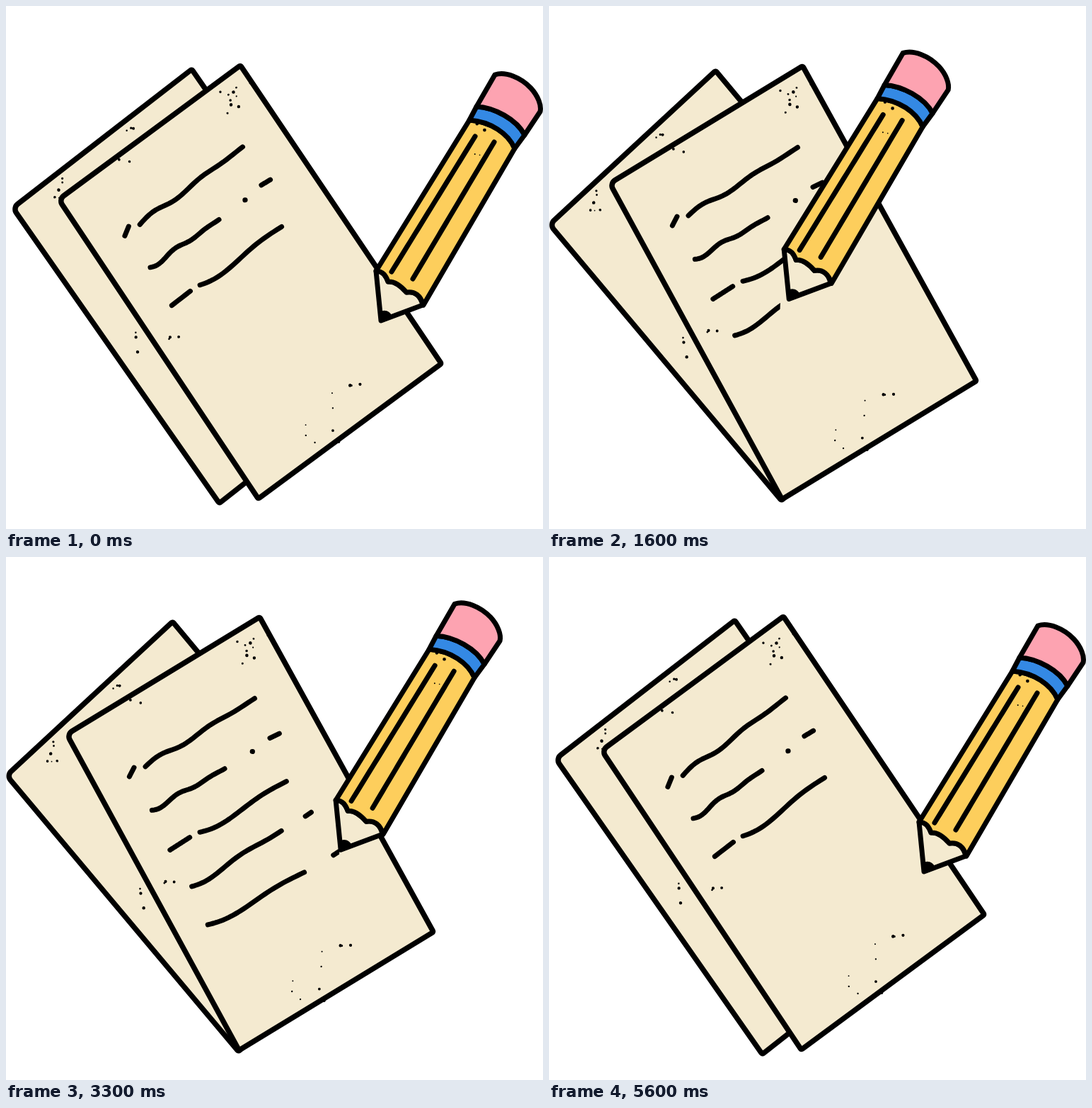
An HTML page with a canvas for the animation above (5730 ms loop, 759 px wide and 738 px high).

```html
<!DOCTYPE html>
<html lang="en">
<head>
<meta charset="utf-8">
<title>Writing pencil</title>
<style>
  html, body { margin: 0; width: 100%; height: 100%; overflow: hidden; background: #fff; }
  canvas { display: block; }
</style>
</head>
<body>
<canvas id="stage" width="759" height="738"></canvas>
<script>
const ctx = document.getElementById('stage').getContext('2d');
const LOOP = 5730, LAST = 70, TILT = 2.55;
const INK = '#000', CREAM = '#f4ead0', YELLOW = '#fdce5c', PINK = '#fda3b1', BLUE = '#3489e4';
const REST = [529, 444];

const clamp = v => Math.min(1, Math.max(0, v));
const lerp = (a, b, p) => a + (b - a) * p;
const ease = p => 0.5 - 0.5 * Math.cos(Math.PI * clamp(p));
const span = (n, from, to) => ease((n - from) / (to - from));

let seed = 7;
const random = () => (seed = seed * 16807 % 2147483647) / 2147483647;

// Ink specks scattered around a point
function specks(cx, cy, rx, ry, count) {
  const path = new Path2D();
  for (let i = 0; i < count; i++) {
    const x = cx + rx * (2 * random() - 1), y = cy + ry * (2 * random() - 1);
    path.moveTo(x, y);
    path.arc(x, y, .8 + 1.6 * random(), 0, 7);
  }
  return path;
}

// Closed outline; only the first corner is clearly rounded
function outline(...corners) {
  const path = new Path2D(), [a, b] = corners;
  path.moveTo((a[0] + b[0]) / 2, (a[1] + b[1]) / 2);
  for (let i = 1; i <= corners.length; i++) {
    const at = corners[i % corners.length], next = corners[(i + 1) % corners.length];
    path.arcTo(...at, ...next, at === a ? 9 : 2);
  }
  path.closePath();
  return path;
}

// Pen stroke that wobbles most at its start
function pen(x0, y0, x1, y1, bow = 0, turns = 1) {
  const path = new Path2D();
  for (let p = 0; p <= 1; p += 1 / 32) {
    const wobble = bow * (1 - p) * Math.sin(2 * Math.PI * turns * p);
    path.lineTo(lerp(x0, x1, p), lerp(y0, y1, p) + wobble);
  }
  return path;
}

function join(...paths) {
  const all = new Path2D();
  paths.forEach(p => all.addPath(p));
  return all;
}

// Both sheets are described halfway through their turn, then tilted either way.
const backSheet = {
  pivot: [270, 395],
  shape: outline([5, 296.5], [249, 90], [556, 493], [315, 700]),
  specks: join(specks(175, 172, 14, 10, 3), specks(62, 270, 18, 24, 6), specks(189, 477, 8, 18, 3))
};
const frontSheet = {
  pivot: [335, 390],
  shape: outline([80, 261.5], [345, 84], [610, 517], [343, 696]),
  specks: join(specks(337, 131, 25, 24, 10), specks(167, 209, 21, 13, 2),
    specks(232, 464, 10, 6, 3), specks(475, 555, 25, 18, 5), specks(440, 605, 26, 20, 6))
};

const oldLines = join(
  pen(171, 317, 177, 304), pen(193, 302, 343, 199, -4.5, 2),
  pen(205, 363, 305, 300, 4, 2), pen(343, 274, 343.3, 274), pen(367, 254, 380, 247),
  pen(233, 418, 260, 399), pen(274, 391, 393, 314, 9, .8));

// on / off: steps during which a line is written and wiped; from / to: pencil tip meanwhile
const newLines = [
  { on: [13, 27.6], off: [57.35, 62.2], from: [254, 470], to: [434, 349], x: [262, 436],
    path: join(pen(266, 468, 389, 384, 6, 1.2), pen(422, 362, 430, 356)) },
  { on: [34, 41.5], off: [60.5, 65.5], from: [302, 524], to: [474, 412], x: [285, 477],
    path: join(pen(291, 521, 424, 441, 8.5, .8), pen(464, 415, 471, 410)) },
  { on: [44.6, 53.6], off: [64, 69.8], from: [318, 580], to: [500, 458], x: [330, 508],
    path: join(pen(335, 571, 451, 486, 3, 2), pen(500, 463, 503, 462)) }
];

// The pencil leaves its rest, follows every line and comes back.
const route = [
  [0, REST], [11, newLines[0].from],
  ...newLines.flatMap(l => [[l.on[0], l.from], [l.on[1], l.to]]),
  [56, REST], [LAST + 1, REST]
];

const pencil = {
  body: new Path2D('M655 161 C685 163 710 180 719 201 L590 422 ' +
    'C586 409 578 402 566 404 C559 396 550 388 540 389 C537 381 533 374 523 374 Z'),
  band: new Path2D('M665 142 C690 143 722 160 733 182 L719 201 C710 180 685 163 655 161 Z'),
  rubber: new Path2D('M691 97 C706 92 728 101 742 116 C752 127 757 140 755 149 L733 182 C722 160 690 143 665 142 Z'),
  wood: new Path2D('M523 374 C533 374 537 381 540 389 C550 388 559 396 566 404 ' +
    'C578 402 586 409 589 422 L530 444 Z'),
  lead: new Path2D('M529 444 L528 432 C535 427 543 431 546 438 Z'),
  grooves: join(pen(663, 184, 545, 375), pen(690, 192, 575, 385)),
  specks: specks(666, 190, 13, 24, 4)
};

function shape(path, fill) {
  ctx.fillStyle = fill;
  ctx.fill(path);
  ctx.stroke(path);
}

function ink(path) {
  ctx.fillStyle = INK;
  ctx.fill(path);
}

function tipAt(n) {
  const i = route.findIndex(stop => stop[0] > n);
  const [t0, a] = route[i - 1], [t1, b] = route[i];
  const p = span(n, t0, t1);
  return [lerp(a[0], b[0], p), lerp(a[1], b[1], p)];
}

function sheet({ pivot: [x, y], shape: path, specks }, degrees, content) {
  ctx.save();
  ctx.translate(x, y);
  ctx.rotate(degrees * Math.PI / 180);
  ctx.translate(-x, -y);
  ctx.lineWidth = 7.5;
  shape(path, CREAM);
  ink(specks);
  ctx.lineWidth = 7;
  if (content) content();
  ctx.restore();
}

function writing(n, [tx, ty]) {
  ctx.stroke(oldLines);
  for (const { on, off, x, path } of newLines) {
    if (n <= on[0] || n >= off[1]) continue;
    // The line trails the tip and catches up at its end.
    const lag = 11 * (1 - span(n, ...on) ** 8);
    const left = n > off[0] ? lerp(...x, span(n, ...off)) : 0;
    const right = n < on[1] ? tx - lag + (ty - 390) * .0445 : 759;
    if (right <= left) continue;
    ctx.save();
    ctx.beginPath();
    ctx.rect(left, 0, right - left, 738);
    ctx.clip();
    ctx.stroke(path);
    ctx.restore();
  }
}

function drawPencil([x, y]) {
  ctx.save();
  ctx.translate(x - REST[0], y - REST[1]);
  shape(pencil.wood, CREAM);
  shape(pencil.body, YELLOW);
  shape(pencil.band, BLUE);
  shape(pencil.rubber, PINK);
  ctx.stroke(pencil.grooves);
  ink(pencil.lead);
  ink(pencil.specks);
  ctx.restore();
}

function draw(ms) {
  // 12.5 poses a second, shown on a 30 Hz grid
  const tick = Math.floor(ms * .03 + .15);
  const n = Math.min(LAST, Math.floor(tick * 5 / 12));
  const tilt = TILT * (2 * (span(n, 0, 10.7) - span(n, 53, 63)) - 1);
  const tip = tipAt(n);

  ctx.fillStyle = '#fff';
  ctx.fillRect(0, 0, 759, 738);
  ctx.strokeStyle = INK;
  ctx.lineWidth = 7;
  ctx.lineCap = ctx.lineJoin = 'round';
  sheet(backSheet, -tilt);
  sheet(frontSheet, tilt, () => writing(n, tip));
  drawPencil(tip);
}

const start = performance.now();
function loop() {
  draw((performance.now() - start) % LOOP);
  requestAnimationFrame(loop);
}
loop();
</script>
</body>
</html>
```
